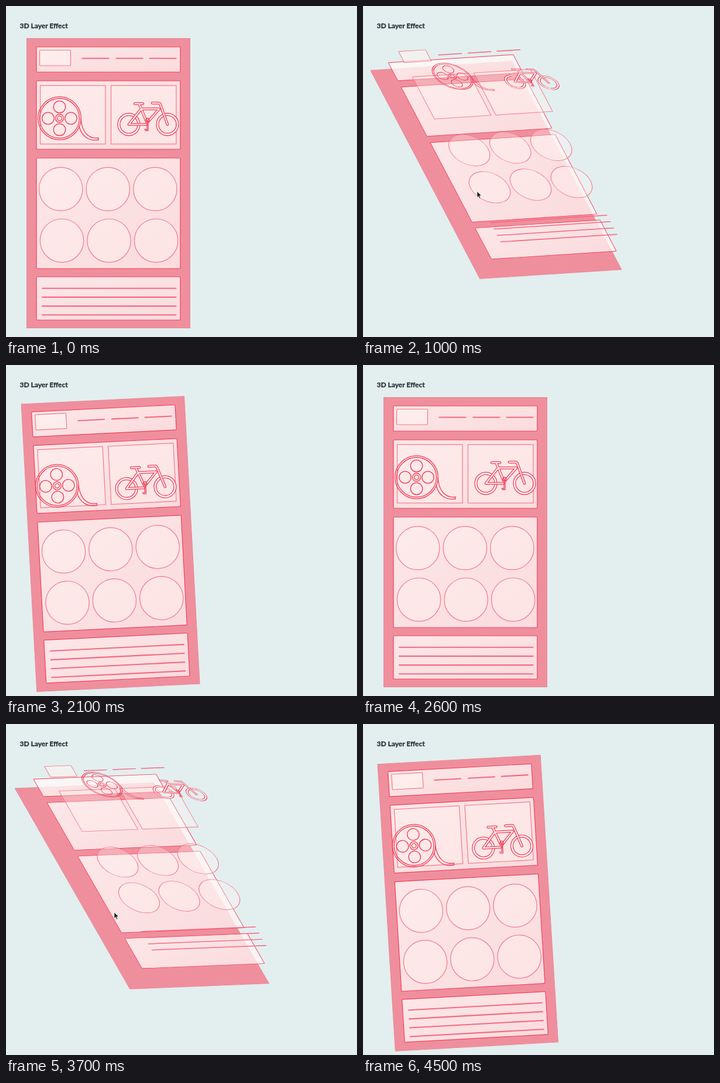
These frames come from a looping animation (600 by 566 pixels, 4600 ms). An HTML page:

```html
<!DOCTYPE html>
<html lang="en">
<head>
<meta charset="utf-8">
<title>3D Layer Effect</title>
<style>
  html, body { margin: 0; width: 100%; height: 100%; overflow: hidden; background: #e3eeef; }
  svg { display: block; width: 600px; height: 566px; }
  text { font: 700 12px Lato, "Open Sans", sans-serif; fill: #2b3339; stroke: #2b3339; stroke-width: .35; }
  .panel { fill: url(#sheen); stroke: #f4405c; stroke-width: 1.2; }
  .thin { fill: #fff4f0; fill-opacity: .3; stroke: #f4788a; stroke-width: 1.2; }
  .logo { fill-opacity: .6; }
  .bar { stroke: #f56a80; stroke-width: 2.1; stroke-linecap: round; }
  .icon { fill: none; stroke: #ec3d58; stroke-width: 1.3; stroke-linejoin: round; stroke-linecap: round; }
  .rim { stroke: #fdeeee; stroke-width: 2.2; }
  .tube { stroke-width: 4.6; }
  .core { stroke: #fdeeee; stroke-width: 2.1; }
</style>
</head>
<body>
<svg viewBox="0 0 600 566">
  <defs>
    <linearGradient id="sheen" x1="0" y1="0" x2="1" y2="1">
      <stop offset="0" stop-color="#fffaf8" stop-opacity=".82"/>
      <stop offset=".5" stop-color="#fff8f6" stop-opacity=".78"/>
      <stop offset="1" stop-color="#fff6f5" stop-opacity=".74"/>
    </linearGradient>
  </defs>
  <text x="23.5" y="38">3D Layer Effect</text>
  <g id="base"><rect x="35.5" y="55.5" width="279" height="495" fill="#ef8f9d" stroke="#ea8495"/></g>
  <g id="panels"></g>
  <g id="contents"></g>
  <g id="icons" class="icon"></g>
  <path id="cursor" d="M0 0V10.5L2.5 8.3L4.2 12.2L6 11.4L4.3 7.6H7.6Z" fill="#1c1f22" stroke="#f5f7f7" stroke-width=".7"/>
</svg>
<script>
const LOOP = 4600, STEP = 100, DURATION = 900;
const CENTER = { x: 175, y: 303 };
const byId = id => document.getElementById(id);

const rect = (cls, x, y, w, h, r = 0) =>
  `<rect class="${cls}" x="${x}" y="${y}" width="${w}" height="${h}" rx="${r}"/>`;
const circle = (x, y, r, cls = "") => `<circle class="${cls}" cx="${x}" cy="${y}" r="${r}"/>`;
const bar = (x1, x2, y) => `<path class="bar" d="M${x1} ${y}H${x2}"/>`;
const path = (d, cls = "") => `<path class="${cls}" d="${d}"/>`;

function wheel(x, y) {
  return circle(x, y, 19) + circle(x, y, 15.2) + circle(x, y, 17.1, "rim");
}

function bike() {
  const frame = "M210 202.5L231 176H262L241 200L228 168M210 202.5H240"
    + "M220 167H234M250 166H261Q263 166 264 169L276 202.5";
  return wheel(210, 202.5) + wheel(276, 202.5)
    + path(frame, "tube") + path(frame, "core")
    + circle(242, 195, 3) + path("M241 198V211M243 198V213M237 211H241M238 213H243");
}

function reel() {
  const holes = [[0, -19.5], [0, 19.5], [-19.5, 0], [19.5, 0]];
  return circle(91.5, 192, 36.8) + circle(91.5, 192, 34)
    + holes.map(([x, y]) => circle(91.5 + x, 192 + y, 10.2)).join("")
    + circle(91.5, 192, 7) + circle(91.5, 192, 3.8)
    + path("M128 193C130 216 141 228 158 225.5V229C141 231.5 129 222 125 206");
}

byId("panels").innerHTML = [[70, 43], [128, 117], [260, 189], [463, 74]]
  .map(([y, h]) => rect("panel", 52, y, 246, h, 1.5)).join("");

byId("contents").innerHTML = rect("thin logo", 57.5, 75.5, 53, 26.5, 1)
  + [130, 188, 245].map(x => bar(x + .5, x + 45.5, 89.5)).join("")
  + rect("thin", 58.5, 136, 111.5, 100) + rect("thin", 179.5, 136, 111.5, 100)
  + [0, 1, 2].map(i => circle(93.7 + 80.6 * i, 313, 37.2, "thin")
    + circle(95.5 + 80.6 * i, 401.2, 37.2, "thin")).join("")
  + [0, 1, 2, 3].map(i => bar(62, 290.5, 482.7 + 15.2 * i)).join("");

byId("icons").innerHTML = reel() + bike();

// The CSS "ease" curve, solved by bisection.
function ease(x) {
  if (x <= 0) return 0;
  if (x >= 1) return 1;
  let lo = 0, hi = 1;
  for (let i = 0; i < 24; i++) {
    const u = (lo + hi) / 2;
    if (.75 * u * (1 - u) + u ** 3 < x) lo = u; else hi = u;
  }
  return .3 * lo * (1 - lo) ** 2 + 3 * lo * lo * (1 - lo) + lo ** 3;
}

const hovers = [{ enter: 372, leave: 1571 }, { enter: 2772, leave: 3992 }];

function tilt(t) {
  const { enter, leave } = hovers[t < hovers[1].enter ? 0 : 1];
  return t < leave ? ease((t - enter) / DURATION) : 1 - ease((t - leave) / DURATION);
}

// rotateX · rotateY · rotateZ · translate3d, seen without perspective.
function place(id, p, [ax, ay, az], [x, y, z]) {
  const [a, b, c] = [ax, ay, az].map(deg => deg * p * Math.PI / 180);
  const { sin, cos } = Math;
  const m11 = cos(b) * cos(c), m12 = -cos(b) * sin(c), m13 = sin(b);
  const m21 = sin(a) * sin(b) * cos(c) + cos(a) * sin(c);
  const m22 = cos(a) * cos(c) - sin(a) * sin(b) * sin(c);
  const m23 = -sin(a) * cos(b);
  const dx = CENTER.x + p * (m11 * x + m12 * y + m13 * z);
  const dy = CENTER.y + p * (m21 * x + m22 * y + m23 * z);
  byId(id).setAttribute("transform",
    `matrix(${m11} ${m21} ${m12} ${m22} ${dx} ${dy}) translate(${-CENTER.x} ${-CENTER.y})`);
}

// Pointer visits as [time, x, y]; hidden outside each visit.
const visits = [
  [[400, 472, 222], [500, 366, 248], [600, 247, 287], [700, 200, 312], [1300, 190, 322],
   [1400, 215, 305], [1500, 390, 205], [1600, 562, 111]],
  [[2800, 519, 235], [2900, 335, 272], [3000, 157, 293], [3200, 180, 316], [3700, 185, 322],
   [3800, 215, 305], [3900, 385, 205], [4000, 556, 115]]
];

function movePointer(t) {
  const visit = visits.find(v => t >= v[0][0] && t <= v[v.length - 1][0]);
  const cursor = byId("cursor");
  cursor.setAttribute("visibility", visit ? "visible" : "hidden");
  if (!visit) return;
  const i = Math.max(1, visit.findIndex(key => key[0] >= t));
  const [t0, x0, y0] = visit[i - 1], [t1, x1, y1] = visit[i];
  const k = (t - t0) / (t1 - t0);
  cursor.setAttribute("transform", `translate(${x0 + (x1 - x0) * k} ${y0 + (y1 - y0) * k})`);
}

function render(time) {
  const t = Math.floor((time % LOOP) / STEP) * STEP;
  const p = tilt(t);
  const angles = [50, 20, -25];
  place("base", p, angles, [25, 33, 67]);
  place("panels", p, angles, [25, 33, 102]);
  place("contents", p, angles, [25, 33, 137]);
  place("icons", p, [60, 20, -25], [-23 * p, 109, 236]);
  movePointer(t);
}

const start = performance.now();
function tick() {
  render(performance.now() - start);
  requestAnimationFrame(tick);
}
tick();
</script>
</body>
</html>
```
